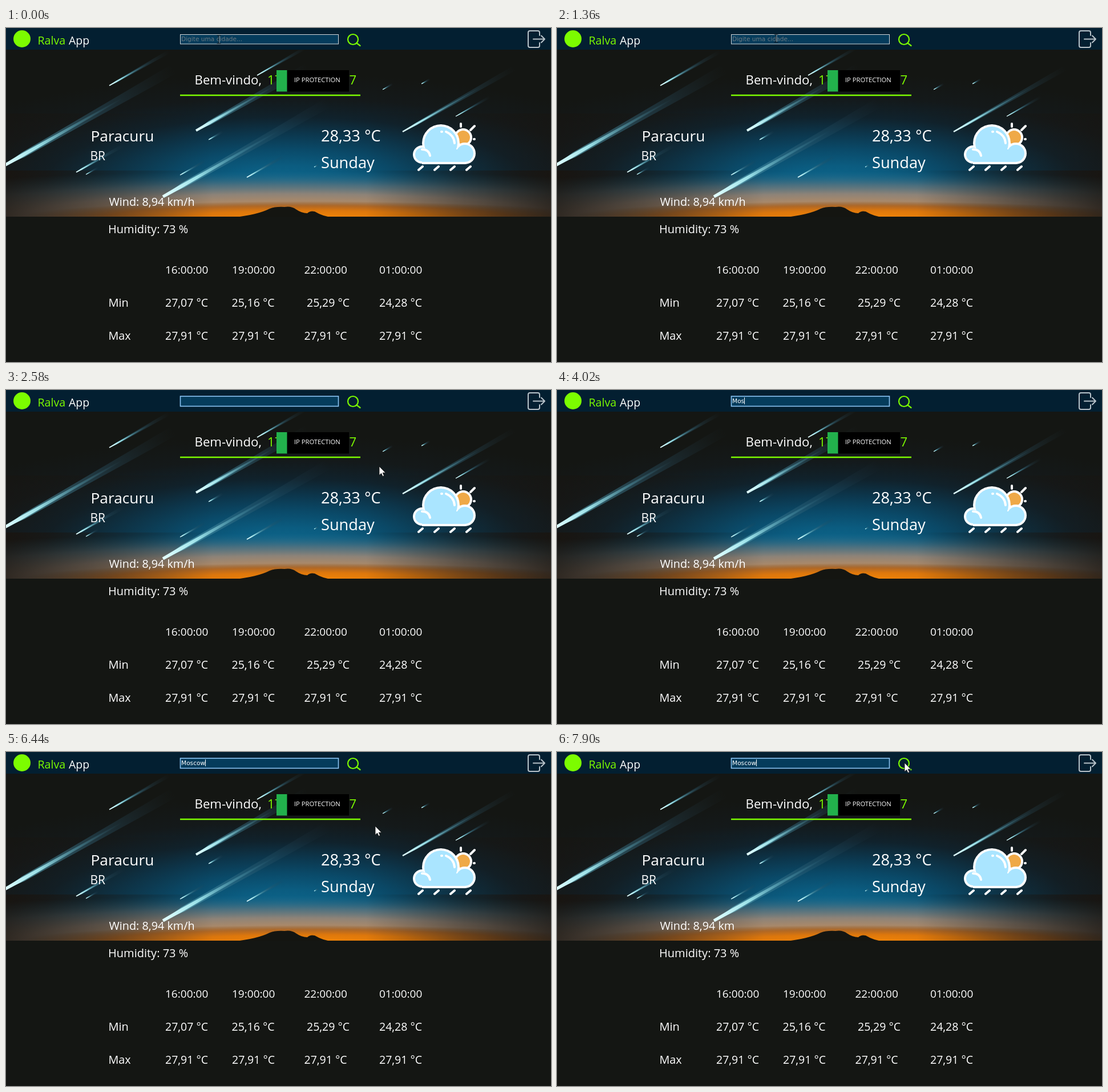
An HTML page for the animation above (8000 ms loop, 955 by 586 pixels).

```html
<!DOCTYPE html>
<html lang="pt">
<head>
<meta charset="utf-8">
<title>Ralva App</title>
<style>
  html, body { margin: 0; width: 100%; height: 100%; overflow: hidden; background: #141613; }
  svg { display: block; width: 955px; height: 586px; }
  text { font-family: "Open Sans", "Noto Sans", sans-serif; fill: #fff; white-space: pre; }
  .field { font-family: "DejaVu Sans", sans-serif; font-size: 10.6px; }
  .green { fill: #7cfc00; }
  .line { fill: none; stroke-linecap: round; stroke-linejoin: round; }
</style>
</head>
<body>
<svg viewBox="0 0 955 586">
  <defs>
    <radialGradient id="sky" gradientUnits="userSpaceOnUse" cx="0" cy="0" r="1"
      gradientTransform="translate(490 270) scale(700 190)">
      <stop offset="0" stop-color="#0d668c"/>
      <stop offset=".15" stop-color="#0b5c80"/>
      <stop offset=".3" stop-color="#0a4a69"/>
      <stop offset=".45" stop-color="#0c364c"/>
      <stop offset=".6" stop-color="#10222c"/>
      <stop offset=".78" stop-color="#14191a"/>
      <stop offset="1" stop-color="#141613"/>
    </radialGradient>
    <radialGradient id="haze" gradientUnits="userSpaceOnUse" cx="0" cy="0" r="1"
      gradientTransform="translate(500 331) scale(950 80)">
      <stop offset="0" stop-color="#c58a50"/>
      <stop offset=".3" stop-color="#b08a66"/>
      <stop offset=".5" stop-color="#8d8378"/>
      <stop offset=".7" stop-color="#56737f" stop-opacity=".85"/>
      <stop offset="1" stop-color="#19688a" stop-opacity="0"/>
    </radialGradient>
    <radialGradient id="dusk" gradientUnits="userSpaceOnUse" cx="0" cy="0" r="1"
      gradientTransform="translate(530 331) scale(500 27)">
      <stop offset="0" stop-color="#f08408"/>
      <stop offset=".4" stop-color="#dd770c"/>
      <stop offset=".7" stop-color="#b0621a" stop-opacity=".85"/>
      <stop offset="1" stop-color="#7a4a1c" stop-opacity="0"/>
    </radialGradient>
    <linearGradient id="sides">
      <stop offset="0" stop-color="#1a130d" stop-opacity=".8"/>
      <stop offset=".18" stop-color="#1a130d" stop-opacity=".45"/>
      <stop offset=".38" stop-color="#1a130d" stop-opacity="0"/>
      <stop offset=".66" stop-color="#1a130d" stop-opacity="0"/>
      <stop offset=".84" stop-color="#1a130d" stop-opacity=".45"/>
      <stop offset="1" stop-color="#1a130d" stop-opacity=".8"/>
    </linearGradient>
  </defs>

  <rect width="955" height="586" fill="#141613"/>
  <rect y="38" width="955" height="293" fill="url(#sky)"/>
  <rect y="240" width="955" height="91" fill="url(#haze)"/>
  <rect y="300" width="955" height="31" fill="url(#dusk)"/>
  <rect y="250" width="955" height="81" fill="url(#sides)"/>
  <rect y="150" width="955" height="100" fill="url(#sides)" opacity=".4"/>
  <g id="streaks"></g>
  <path fill="#141511" d="M400 332Q440 328 462 317Q472 313 488 314Q500 312 508 318Q518 325 528 325Q533 320 541 322Q556 331 572 332Z"/>

  <rect width="955" height="38" fill="#031f31"/>
  <circle cx="28" cy="19" r="15" class="green"/>
  <rect id="box" fill="#053c5c"/>
  <g class="line" stroke="#7cfc00" stroke-width="2.2">
    <circle cx="608" cy="20" r="9"/><path d="M614.500 26.500L620.500 31"/>
  </g>
  <path class="line" stroke="#b9c3ca" stroke-width="2" d="M935 13V8Q935 5 932 5H918Q915 5 915 8V31Q915 34 918 34H932Q935 34 935 31V26M924 19.500H944M938 13.500L944 19.500L938 25.500"/>
  <path d="M305 118H621" stroke="#7cfc00" stroke-width="2.6"/>

  <g id="labels"></g>
  <rect x="474" y="74" width="19" height="37.500" fill="#22b14c"/>
  <rect x="492.500" y="74" width="108.500" height="37.500" fill="#000"/>
  <text x="505" y="95" font-size="11.200">IP PROTECTION</text>

  <g class="line" stroke="#fff" stroke-width="4">
    <circle cx="801" cy="192" r="14" fill="#efa947"/>
    <path d="M797 168V173M814 179L821 172M820 195H821M723 249L730 243M751 249L758 243M779 249L786 243M807 249L814 243"/>
  </g>
  <g id="cloud"></g>
  <path class="line" stroke="#fff" stroke-width="4" d="M729 213Q741 213 743 224M771 182Q785 188 786 202M763 182H764"/>

  <text id="hint" class="field" x="307" y="23" style="fill:#6f7a82">Digite uma cidade...</text>
  <text id="typed" class="field" x="307" y="23"></text>
  <path id="caret" stroke="#fff" d="M0 13V25"/>
  <g id="beam" class="line">
    <path stroke="#0b1218" stroke-width="1.200" d="M-3 -7H3M0 -7V7M-3 7H3"/>
    <path stroke="#c9d3d9" stroke-width=".8" d="M1 -6V6"/>
  </g>
  <path id="arrow" fill="#fff" stroke="#111" stroke-width=".8" d="M0 0V15.500L3.600 12.200L6 17.500L8.500 16.400L6.200 11.200H11Z"/>
</svg>
<script>
const $ = id => document.getElementById(id);

function add(parent, tag, attrs, content = '') {
  const node = document.createElementNS('http://www.w3.org/2000/svg', tag);
  for (const key in attrs) node.setAttribute(key, attrs[key]);
  node.textContent = content;
  return parent.appendChild(node);
}

function label(content, x, y, size, cls = '') {
  return add($('labels'), 'text', { x, y, 'font-size': size, class: cls }, content);
}

const TRAIL = [[0, '#7fd0dc', .8], [.25, '#4a93a8', .55], [.55, '#2f6075', .4], [1, '#263c49', 0]];
const CORE = [[0, '#e4ffff', 1], [.3, '#a5ecf2', .9], [.6, '#5fa9ba', .5], [1, '#3a6f84', 0]];

function fade(id, x, y, dx, dy, stops) {
  const grad = add($('streaks'), 'linearGradient', {
    id, gradientUnits: 'userSpaceOnUse', x1: x, y1: y, x2: x + dx, y2: y + dy
  });
  for (const [offset, color, alpha] of stops)
    add(grad, 'stop', { offset, 'stop-color': color, 'stop-opacity': alpha });
  return `url(#${id})`;
}

// A meteor is a dim widening trail with a bright core that tapers away from its head.
function streak([x, y, dx, width], i) {
  const dy = -dx * 0.57;
  const at = (p, side) =>
    `${x + dx * p + side * width * .5} ${y + dy * p + side * width * .87}`;
  add($('streaks'), 'path', {
    fill: fade('trail' + i, x, y, dx, dy, TRAIL),
    d: `M${at(0, 0)}L${at(.12, -.45)}L${at(1, -.9)}L${at(1, .9)}L${at(.12, .45)}Z`
  });
  add($('streaks'), 'path', {
    fill: fade('core' + i, x, y, dx * .7, dy * .7, CORE),
    d: `M${at(0, -.25)}L${at(.1, -.32)}L${at(.7, -.1)}L${at(.7, .1)}L${at(.1, .32)}L${at(0, .25)}Z`
  });
}

[[-6, 243, 300, 10], [181, 101, 105, 3.5], [333, 180, 195, 8], [275, 296, 290, 10],
 [440, 83, 85, 3], [695, 182, 196, 5], [788, 155, 60, 2.5], [123, 253, 85, 3.5],
 [140, 257, 22, 2], [422, 262, 65, 3], [305, 258, 44, 2.5], [355, 196, 26, 2.5],
 [660, 108, 18, 2], [728, 98, 15, 2], [540, 244, 8, 2]].forEach(streak);

function cloud(inset, fill) {
  [[729, 222, 16], [762, 202, 33], [804, 220, 19]].forEach(([cx, cy, r]) =>
    add($('cloud'), 'circle', { cx, cy, r: r - inset, fill }));
  add($('cloud'), 'rect', { x: 729, y: 213, width: 75, height: 26 - inset, fill });
}
cloud(0, '#fff');
cloud(4, '#aae5ff');

label('Ralva', 55.5, 29, 19.6, 'green');
label('App', 110, 29, 19.4);
label('Bem-vindo,', 330.5, 98.5, 22.2);
label('17', 458, 98.5, 22.1, 'green');
label('7', 601.5, 98.5, 22.1, 'green');
label('Paracuru', 148.5, 198.5, 26.3);
label('BR', 147.5, 232, 21);
label('28,33 °C', 552, 198.5, 27.2);
label('Sunday', 552, 246, 27.2);
const wind = label('', 180.5, 312, 19.8);
label('Humidity: 73 %', 179, 359.5, 20);
label('Min', 179.5, 489, 20);
label('Max', 179.5, 547, 19.8);
[[279, '16:00:00', '27,07', 279], [396, '19:00:00', '25,16', 395.5],
 [522.5, '22:00:00', '25,29', 527], [654, '01:00:00', '24,28', 654]]
  .forEach(([x, hour, min, minX]) => {
    label(hour, x, 430.5, 19);
    label(min + ' °C', minX, 489, 19.5);
    label('27,91 °C', x, 547, 19.5);
  });

const LOOP = 8000, FOCUS = 1810, CLICK = 7900;
const keyTimes = [3600, 3880, 4020, 4390, 4520, 5350];
const caretFlips = [1810, 2340, 3150, 5100, 5350, 5890, 6440, 6960, 7440];

// Pointer moves: start, end, steps, from, to.
const moves = [
  [120, 1050, 7, [373, 20], [384, 18]],
  [1810, 2580, 5, [384, 18], [654, 134]],
  [6170, 6440, 2, [654, 134], [647, 130]],
  [6440, 7170, 5, [647, 130], [609, 19]]
];

function pointerAt(t) {
  let pos = moves[0][3];
  for (const [start, end, steps, from, to] of moves) {
    if (t < start) break;
    const p = Math.min(1, Math.floor((t - start) / (end - start) * steps + 1e-6) / steps);
    const ease = p * p * (3 - 2 * p);
    pos = from.map((v, i) => v + (to[i] - v) * ease);
  }
  return pos;
}

const show = (id, on) => $(id).setAttribute('visibility', on ? 'visible' : 'hidden');

function render(t) {
  const focused = t >= FOCUS;
  const border = focused
    ? { x: 305.5, y: 11, width: 277, height: 17.5, stroke: '#8cc5f5', 'stroke-width': 1.6 }
    : { x: 305.5, y: 11.5, width: 277, height: 16.5, stroke: '#d3d8db', 'stroke-width': 1 };
  for (const key in border) $('box').setAttribute(key, border[key]);
  show('hint', !focused);

  $('typed').textContent = 'Moscow'.slice(0, keyTimes.filter(k => t >= k).length);
  const caretX = Math.round(307 + $('typed').getComputedTextLength()) + .5;
  $('caret').setAttribute('transform', `translate(${caretX} 0)`);
  show('caret', caretFlips.filter(k => t >= k).length % 2);

  const [x, y] = pointerAt(t);
  const overField = x > 305 && x < 583 && y > 10 && y < 29;
  const hidden = t >= keyTimes[0] && t < 6170;
  for (const id of ['beam', 'arrow']) $(id).setAttribute('transform', `translate(${x} ${y})`);
  show('beam', !hidden && overField);
  show('arrow', !hidden && !overField);

  wind.textContent = t < CLICK ? 'Wind: 8,94 km/h' : 'Wind: 8,94 km';
}

const origin = performance.now();
function tick() {
  render((performance.now() - origin) % LOOP);
  requestAnimationFrame(tick);
}
tick();
</script>
</body>
</html>
```
